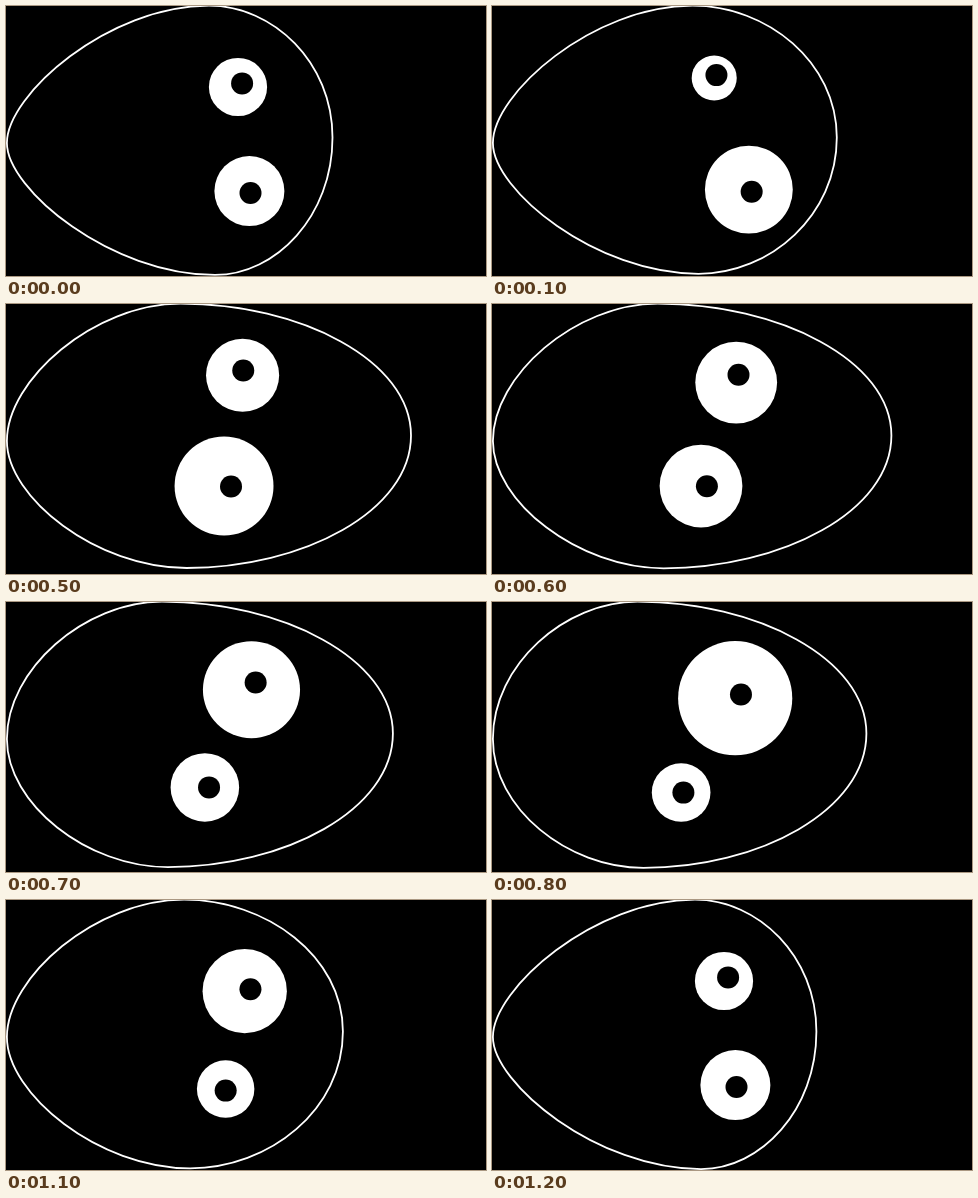
An HTML page for the animation above (1300 ms loop, 480 px wide and 270 px high).

```html
<!DOCTYPE html>
<html lang="en">
<head>
<meta charset="utf-8">
<title>Wobbling egg</title>
<style>
  html, body { margin: 0; width: 100%; height: 100%; overflow: hidden; background: #000; }
  svg { display: block; width: 480px; height: 270px; }
  #egg { fill: none; stroke: #fff; stroke-width: 1.8; }
  .eye { fill: #fff; }
  .pupil { fill: #000; }
</style>
</head>
<body>
<svg viewBox="0 0 480 270">
  <path id="egg"/>
  <circle class="eye"/><circle class="pupil" r="11"/>
  <circle class="eye"/><circle class="pupil" r="11"/>
</svg>
<script>
const STEP = 100, STEPS = 13, TURN = 8.5, LAST = STEPS - 1;
const egg = document.getElementById('egg');
const eyes = document.querySelectorAll('.eye');
const pupils = document.querySelectorAll('.pupil');

const mix = (a, b, t) => a + (b - a) * t;

// A swing with one overtone: cosine and sine weights for each.
const wave = (mean, c1, s1, c2 = 0, s2 = 0) => a =>
  mean + c1 * Math.cos(a) + s1 * Math.sin(a) + c2 * Math.cos(2 * a) + s2 * Math.sin(2 * a);

const upper = {
  x: wave(233.4, -6.1, -12.7, 4.7, -2.2),
  y: wave(81.3, 1.2, -17.8, -1.5, -0.8),
  r: wave(39.9, -5.9, -15.8, -4.9, -2.2),
  lookX: wave(3.2, 0.9, -3.5),
  lookY: wave(-2.7, 2.1, 0.7, -3, -1)
};
const lower = {
  x: wave(220.5, 17.2, 28.2, 5.7, 5.2),
  y: wave(186.5, 1.5, -4.4, -2.9, -0.6),
  r: wave(40, -3.2, 15.2, -1.8),
  lookX: wave(3.5, -2.4, 2.8),
  lookY: wave(1, 0.9, 0.5)
};

// 1 when the pointed end is on the left, 0 when it is on the right.
function leanAt(t) {
  return t < TURN ? 1 - (t / TURN) ** 1.5 : ((t - TURN) / (LAST - TURN)) ** 1.5;
}

function eggPath(t) {
  const lean = leanAt(t);
  const crown = mix(143, 206, lean);
  const left = 0.9, leftY = 137, rightY = 131.5, top = -0.3;
  const right = Math.min(326.5 + 18.3 * t, 405, 474.4 - 12.5 * t);
  const bottom = 269 - (right - 326) / 79 * 5;
  const kl = mix(0.56, 0.35, lean), kr = 0.57;

  // One half of the outline, from the left end over y to the right end.
  const half = (x, y) => {
    const xl = mix(x, left, 0.5), xr = mix(x, right, 0.52);
    return `M${left} ${leftY}
      C${left} ${mix(leftY, y, kl)} ${xl} ${y} ${x} ${y}
      C${xr} ${y} ${right} ${mix(rightY, y, kr)} ${right} ${rightY}`;
  };
  return half(crown - 3, top) + half(crown + 3, bottom);
}

function place(circle, x, y) {
  circle.setAttribute('cx', x);
  circle.setAttribute('cy', y);
}

function draw(now) {
  const t = Math.floor(now / STEP) % STEPS;
  const angle = t / LAST * 2 * Math.PI;
  egg.setAttribute('d', eggPath(t));
  [upper, lower].forEach((eye, i) => {
    const x = eye.x(angle), y = eye.y(angle);
    place(eyes[i], x, y);
    eyes[i].setAttribute('r', eye.r(angle));
    place(pupils[i], x + eye.lookX(angle), y + eye.lookY(angle));
  });
}

const start = performance.now();
function loop() {
  draw(performance.now() - start);
  requestAnimationFrame(loop);
}
loop();
</script>
</body>
</html>
```
